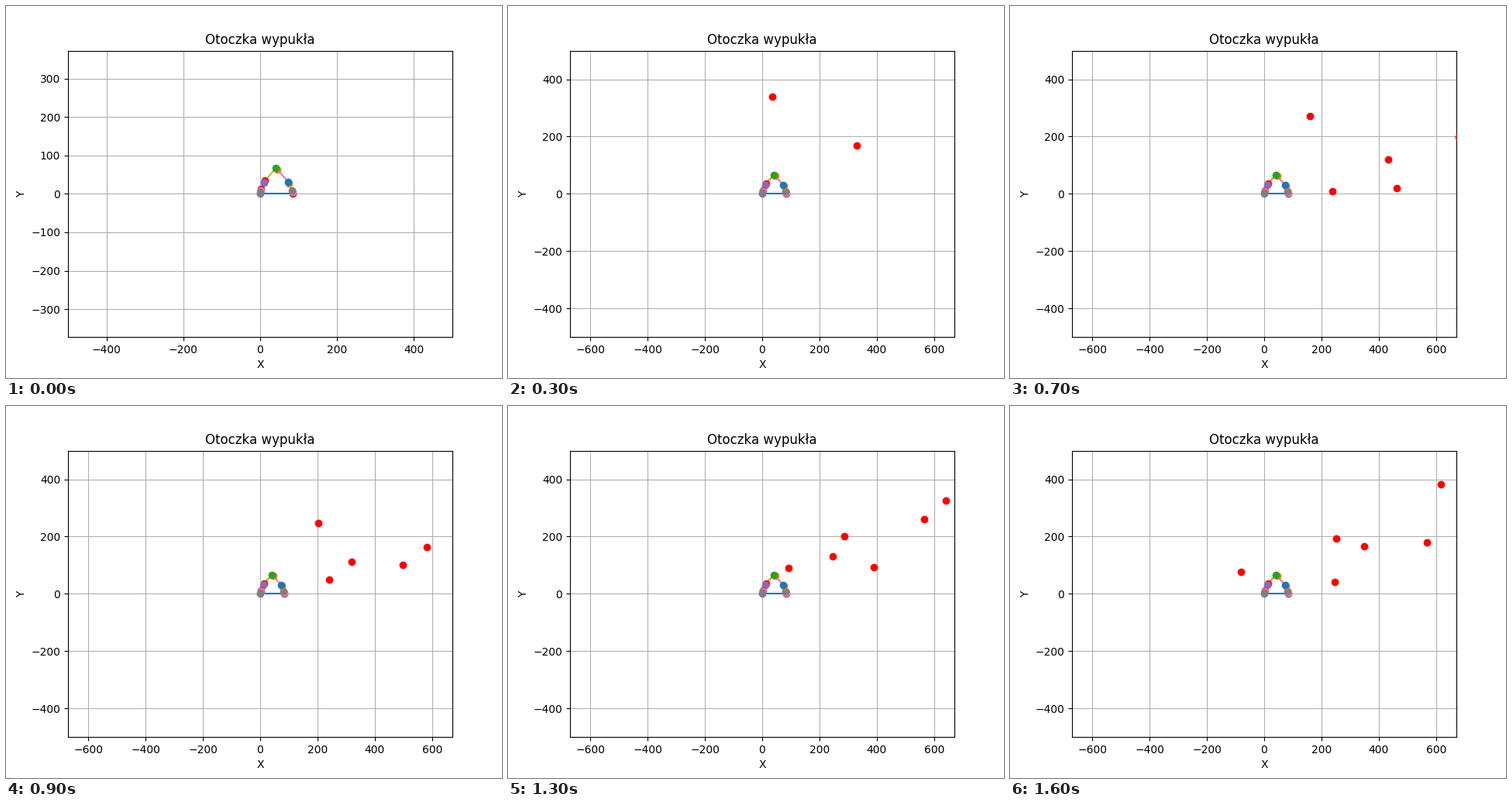
A matplotlib script for the animation above (1700 ms loop, 640 by 480 pixels).

```python
import numpy as np
import matplotlib.pyplot as plt
from matplotlib.animation import FuncAnimation

FRAMES = 17
STEP_MS = 100

# Hull corners, counter-clockwise: x, y, dot colour, colour of the edge to the next corner
HULL = [
    (0, 0, "tab:purple", "tab:blue"),
    (84, 0, "tab:red", "tab:brown"),
    (84, 5, "tab:pink", "tab:pink"),
    (82, 9, "tab:gray", "tab:olive"),
    (75, 28, "tab:orange", "tab:cyan"),
    (72, 32, "tab:blue", "tab:pink"),
    (45, 63, "tab:orange", "tab:orange"),
    (41, 67, "tab:green", "tab:olive"),
    (13, 35, "tab:red", "tab:red"),
    (10, 30, "tab:purple", "tab:purple"),
    (3, 13, "tab:red", "tab:brown"),
    (2, 9, "tab:pink", "tab:pink"),
    (0, 5, "tab:gray", "tab:gray"),
]
LEFT_EDGE = 7  # its colour changes once the points arrive

# Flying points: tick at which the place holds, x, y, speed x, speed y, first tick
FLYERS = np.array([
    (-1, 252, 25, 39.2, 71.8, -1),
    (3, 76, 317, 21.0, -11.6, 0),
    (3, 663, 141, -57.2, -4.95, 0),
    (9, 241, 49.5, 1.5, 20.5, 7),
    (9, 582, 163, -48.0, -17.4, 5),
    (9, 498, 101, 17.0, 40.1, 7),
    (14, 617, 277, -24.5, -48.8, 11),
])


def tick_at(frame):
    """Motion clock: it runs at double speed for two frames."""
    return frame - 2 + min(max(frame - 5, 0), 2)


def flyers_at(frame):
    ref, x, y, vx, vy, first = FLYERS.T
    tick = tick_at(frame)
    alive = (tick >= first) & (frame > 0)
    return (x + vx * (tick - ref))[alive], (y + vy * (tick - ref))[alive]


fig, ax = plt.subplots(figsize=(6.4, 4.8), dpi=100)
ax.set_title("Otoczka wypukła")
ax.set_xlabel("X")
ax.set_ylabel("Y")
ax.grid(True)

edges = []
for a, b in zip(HULL, HULL[1:] + HULL[:1]):
    edges += ax.plot([a[0], b[0]], [a[1], b[1]], color=a[3], zorder=2)
for x, y, colour, _ in HULL:
    ax.plot(x, y, "o", color=colour, zorder=3)
flyers, = ax.plot([], [], "ro", zorder=4)


def set_view(half_x, half_y, x_ticks, y_ticks):
    ax.set_xticks(x_ticks)
    ax.set_yticks(y_ticks)
    ax.set_xlim(-half_x, half_x)
    ax.set_ylim(-half_y, half_y)


def draw(frame):
    if frame == 0:
        set_view(500, 372.6, range(-400, 401, 200), range(-300, 301, 100))
    else:
        set_view(671, 500, range(-600, 601, 200), range(-400, 401, 200))
    edges[LEFT_EDGE].set_color("tab:olive" if frame == 0 else "tab:orange")
    flyers.set_data(*flyers_at(frame))
    return [flyers]


anim = FuncAnimation(fig, draw, frames=FRAMES, interval=STEP_MS,
                     init_func=lambda: draw(0), repeat=True, repeat_delay=0)
plt.show()
```
